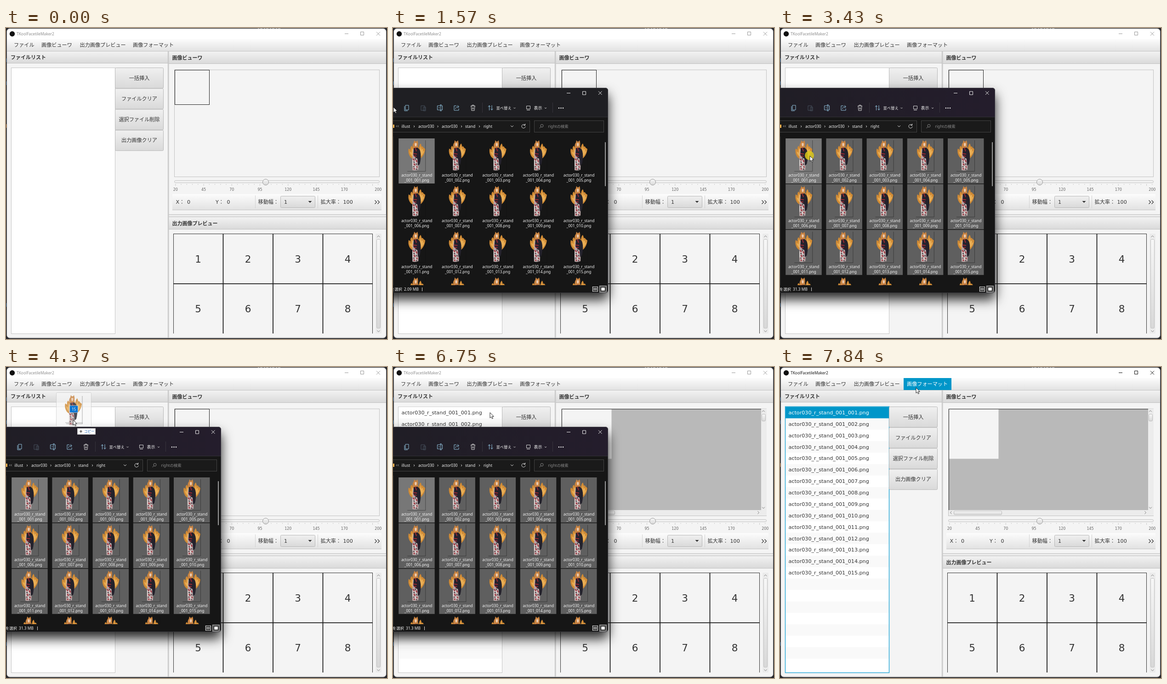
Write an HTML page that moves like this. It is 829 px wide and 676 px high and loops after 8000 ms.

```html
<!DOCTYPE html>
<html lang="ja">
<head>
<meta charset="utf-8">
<title>TKoolFacetileMaker2</title>
<style>
html, body { margin: 0; width: 100%; height: 100%; overflow: hidden; background: #24252a; }
svg { display: block; width: 829px; height: 676px; }
text { white-space: pre; font: 11.15px "DejaVu Sans", "Noto Sans CJK JP", "Noto Sans CJK", sans-serif; fill: #333; }
text.b { font-weight: 700; font-size: 11px; }
text.s { font: 8.4px "Noto Sans", "Noto Sans CJK JP", "Noto Sans CJK", sans-serif; fill: #f4f4f4; }
</style>
</head>
<body>
<svg id="stage" viewBox="0 0 829 676" xmlns="http://www.w3.org/2000/svg"></svg>
<script>
const LOOP = 8000, BLUE = '#0096c9';

// Markup helpers
const rect = (x, y, w, h, fill, more = '') =>
  `<rect x="${x}" y="${y}" width="${w}" height="${h}" fill="${fill}" ${more}/>`;
const box = (x, y, w, h, fill, stroke, more = '') =>
  rect(x, y, w, h, fill, `stroke="${stroke}" ${more}`);
const line = (d, stroke, width = 1, more = '') =>
  `<path d="${d}" fill="none" stroke="${stroke}" stroke-width="${width}" ${more}/>`;
const shape = (d, fill, more = '') => `<path d="${d}" fill="${fill}" ${more}/>`;
const text = (x, y, s, more = '') => `<text x="${x}" y="${y}" ${more}>${s}</text>`;
const mid = 'text-anchor="middle"';
const group = (id, body, more = '') => `<g id="${id}" ${more}>${body}</g>`;
const times = (n, f) => Array.from({ length: n }, (_, i) => f(i)).join('');
const grad = (id, a, b) => `<linearGradient id="${id}" x2="0" y2="1"><stop stop-color="${a}"/><stop offset="1" stop-color="${b}"/></linearGradient>`;
const chevron = (x, y, dir, color = '#777', r = 3) => {
  const turn = { down: 0, left: 90, up: 180, right: 270 }[dir];
  return line(`M${-r} ${-r / 2}L0 ${r / 2} ${r} ${-r / 2}`, color, 1, `transform="translate(${x} ${y}) rotate(${turn})"`);
};
const fileName = i => `actor030_r_stand_001_${String(i + 1).padStart(3, '0')}.png`;

const figure = `<g id="figure">
  ${shape('M36 46Q26 44 23 36Q20 29 22 22L26 25Q25 19 28 16L33 22 44 20Q45 13 48 11Q50 15 50 18Q53 16 54 20L58 23Q57 31 54 36Q51 42 44 46Z', '#cf8a35')}
  ${shape('M31 40Q25 36 24 28L28 31 29 21 34 28ZM45 39Q46 26 48 16L50 25 53 22 53 29 56 26Q54 36 45 42Z', '#e9ae55')}
  ${shape('M31 21Q29 13 33 9L34 4 36.500 7 39 6.500 41 4Q43 10 42 15L43 23 39 26 33 26Z', '#c98442')}
  ${shape('M35 11Q37 9 39.500 11L39 16Q37 18 35.500 16Z', '#eccbb0')}
  ${shape('M31 24L42 22 44 40 43 68Q37 71 30 69L30 46Z', '#b9a5a5')}
  ${shape('M33 21L41 20Q47 23 48 33Q49 44 46 56L42 59 41 44 37 42 32 36Z', '#24222c')}
  ${line('M36 20L39 28M32 33L40 34M33 38L39 39', '#9c2a33', 2)}
  ${line('M32 44L34 48M38 47L40 51M33 55L36 58M39 61L41 63M33 65L35 67', '#a0303a', 2.4)}
  ${line('M36 43L37 46M32 51L35 52M38 55L40 57M32 61L34 62M38 66L40 68', '#3a3039', 1.8)}
  ${line('M36 48L37 54M36.500 60L37 66M31 47L31 60', '#ece6e3', 1.4)}</g>`;

const defs = `<defs>${grad('bar', '#fcfcfc', '#e2e2e2')}${grad('head', '#f2f2f2', '#dadada')}
  ${grad('btn', '#f0f0f0', '#d9d9d9')}${grad('thumb', '#f7f7f7', '#d8d8d8')}
  <linearGradient id="mica"><stop stop-color="#201e25"/><stop offset="1" stop-color="#241d2c"/></linearGradient>
  <filter id="shadow" x="-20%" y="-20%" width="140%" height="150%"><feDropShadow dx="0" dy="14" stdDeviation="13" flood-opacity=".85"/></filter>
  <clipPath id="winClip"><rect x="1.500" y="1" width="826" height="673" rx="7"/></clipPath>
  <clipPath id="gridClip"><rect x="360" y="446" width="440" height="218"/></clipPath>
  <clipPath id="panelClip"><rect x="-30" y="130" width="498" height="446" rx="6"/></clipPath>
  <clipPath id="filesClip"><rect x="0" y="236" width="468" height="323"/></clipPath>${figure}</defs>`;

function captionButtons() {
  return group('caption', `<path d="M737 12.500H745M771.500 8.500H778.500V15.500H771.500ZM806 8.500L814 16.500M814 8.500L806 16.500" fill="none"/>`);
}

function header(x, y, w, h, label, tx, ty) {
  return rect(x, y, w, h, 'url(#head)') + line(`M${x} ${y + h}.5h${w}`, '#c2c2c2') + text(tx, ty, label, 'class="b"');
}

function menus() {
  const items = [[17, 'ファイル'], [77, '画像ビューワ'], [160.5, '出力画像プレビュー']];
  return rect(1, 24, 827, 26, 'url(#bar)') + line('M1 50.500H828', '#c4c4c4') +
    items.map(([x, s]) => text(x, 41, s)).join('') +
    rect(269, 24, 104, 26, BLUE, 'id="menuHot"') + text(276, 41, '画像フォーマット', 'id="menuText"');
}

function fileList() {
  const pitch = 24.87, top = 86.8;
  const rows = times(23, i => rect(12, top + i * pitch, 225, i < 22 ? pitch : 664 - top - i * pitch, i % 2 ? '#f9f9f9' : '#fff'));
  const names = times(15, i => text(18.5, 103 + i * pitch, fileName(i), i ? '' : 'id="firstName"'));
  return box(11.5, 86.5, 226, 578, '#fff', '#c6c6c6') +
    group('rows', rows + rect(12, 87, 225, 24.5, BLUE, 'id="rowHot"') + names) +
    box(11.5, 86, 226, 578.5, 'none', '#22a7d8', 'stroke-width="1.400" id="listFocus"');
}

function buttons() {
  return ['一括挿入', 'ファイルクリア', '選択ファイル削除', '出力画像クリア'].map((s, i) => {
    const y = 86.5 + i * 45.2;
    return box(237.5, y, 105, 44.5, 'url(#btn)', '#b8b8b8', 'rx="2"') + text(290, y + 26, s, mid);
  }).join('');
}

function viewer() {
  const empty = box(367.5, 91.5, 75, 75, 'none', '#222');
  const full = rect(367, 91, 434, 220, '#b9b9b9') + rect(368, 92, 107.5, 107.5, '#f4f4f4') +
    line('M367.500 311V91.500H801', '#333') +
    rect(801, 91, 12, 220, '#ececec') + rect(367, 311, 446, 12, '#ececec') +
    box(802.5, 102.5, 8, 15, 'url(#thumb)', '#bbb', 'rx="2"') + box(378.5, 313, 104, 8, 'url(#thumb)', '#bbb', 'rx="2"') +
    chevron(806, 96, 'up') + chevron(806, 306, 'down') + chevron(372, 316.5, 'left') + chevron(795, 316.5, 'right');
  return box(366.5, 91, 446, 232.5, '#f4f4f4', '#c2c2c2') + group('empty', empty) + group('full', full);
}

function slider() {
  const at = v => 368.8 + (v - 20) * 2.45;
  return box(366.5, 331.5, 446, 5, '#f1f1f1', '#c4c4c4', 'rx="2.500"') +
    times(37, i => line(`M${at(20 + i * 5)} 339v${i % 5 ? 2 : 4}`, '#bbb', .8)) +
    [20, 45, 70, 95, 120, 145, 170, 200].map(v => text(at(v), 354, v, mid + ' style="font-size:8px;fill:#666"')).join('') +
    '<circle cx="565" cy="335" r="6.500" fill="url(#thumb)" stroke="#999"/>';
}

function toolbar() {
  return rect(362, 361, 455, 34, 'url(#bar)') + line('M362 395.500H817', '#c4c4c4') +
    line('M542.500 364V392M678.500 364V392', '#d2d2d2') +
    text(369.5, 382, 'X：') + text(394, 382, '0') + text(456, 382, 'Y：') + text(480.5, 382, '0') +
    text(548.5, 382, '移動幅：') + box(597.5, 365.5, 75, 25, 'url(#btn)', '#b8b8b8', 'rx="2"') + text(605, 382, '1') +
    shape('M657.500 376H665.500L661.500 380Z', '#333') + text(684.5, 382, '拡大率：') + text(733.5, 382, '100') +
    line('M802.500 374.500L806.500 378.500 802.500 382.500M808.500 374.500L812.500 378.500 808.500 382.500', '#333', 1.2);
}

function preview() {
  const size = 108.5;
  const nums = times(8, i => text(418 + i % 4 * size, 509.5 + (i >> 2) * size, i + 1, mid + ' style="font-size:21.500px"'));
  return `<g clip-path="url(#gridClip)">${box(364.5, 447.5, 433, 230, 'none', '#333')}
    ${line('M472.500 447V665M581 447V665M689.500 447V665M364 555.800H798', '#1c1c1c', 1.8)}${nums}</g>` +
    rect(804, 447, 13, 217, '#ebebeb') + box(806.5, 459.5, 8, 193, 'url(#thumb)', '#c0c0c0', 'rx="2"') +
    chevron(810.5, 453, 'up') + chevron(810.5, 659, 'down');
}

function mainWindow() {
  return rect(0, 0, 829, 676, '#24252a') + line('M548 .5H598', '#c8c8c8', 1, 'stroke-dasharray="3 2 5 3"') +
    line('M.5 66V74M.5 116V124M.5 598V606', '#3c6c9a') + line('M.5 209V217', '#d08a45') +
    `<g clip-path="url(#winClip)">${rect(0, 0, 829, 676, '#f4f4f4')}${rect(0, 0, 829, 24, '#fff')}
    <circle cx="13.500" cy="12.700" r="5.700" fill="#111"/>
    ${text(23, 16, 'TKoolFacetileMaker2', 'id="title" class="s"')}${captionButtons()}${menus()}
    ${header(2, 51, 350, 25, 'ファイルリスト', 10, 67.5)}${header(354, 51, 474, 26, '画像ビューワ', 361.5, 68.5)}
    ${fileList()}${buttons()}${viewer()}${slider()}${toolbar()}
    ${rect(354, 405, 474, 6, '#ececec')}${line('M354 405.500H828M354 410.500H828', '#bdbdbd')}
    ${header(354, 411, 474, 26, '出力画像プレビュー', 361.5, 428.5)}${preview()}
    ${line('M352.500 51V674M354 51V674', '#bcbcbc')}${line('M2 673H828', '#c4c4c4')}</g>` +
    box(1.5, 1, 826, 673.5, 'none', '#4a4a4a', 'rx="7" stroke-width=".8"');
}

// Explorer panel
const cell = i => ({ x: 12.2 + i % 5 * 88.2, y: 240 + Math.floor(i / 5) * 99.4 });

function files() {
  return times(20, i => {
    const { x, y } = cell(i), name = fileName(i);
    return `<g transform="translate(${x} ${y})">${rect(0, 0, 78.5, 98, '#777', `id="cell${i}"`)}
      ${line('M19 71.500H58.500V4', '#111', 1, 'opacity=".450"')}<use href="#figure"/>
      ${text(39.5, 83, name.slice(0, 16), mid + ' class="s"')}${text(39.5, 94, name.slice(16), mid + ' class="s"')}</g>`;
  });
}

function commandBar() {
  const ink = '#d5d5d5', tint = '#8fbfda', round = 'stroke-linejoin="round"';
  return line('M378 141.500H386M412.500 138H419.500V145H412.500ZM447 137.500L454.500 145M454.500 137.500L447 145', '#eee') +
    line('M27 168H34V178H27ZM25 170V180H32', tint, 1, round) +
    line('M61 169H69V179H61ZM66 172H71V180H66Z', '#47505d', 1, round) +
    line('M104 169H96.500V178H104M105 169H107.500V178H105M102 167H106M104 167V180M102 180H106M99 173.500H102', tint, 1, round) +
    line('M138 169H133V179H143V175M136 176Q136 171 143 171M140 168L143.500 171 140 174', tint, 1, round) +
    line('M169 169.500H179M172 169V167.500H176V169M170 170L171 179.500H177L178 170M173 172.500V177M175 172.500V177', ink) +
    line('M194.500 162V184M347.500 162V184', '#37343c') +
    line('M209.500 179V169M207 171.500L209.500 168.500 212 171.500M215 168V178M212.500 175.500L215 178.500 217.500 175.500', tint) +
    text(224.5, 176.5, '並べ替え', 'class="s"') + chevron(264.5, 174, 'down', ink, 2) +
    line('M290.500 169.500H298.500V176H290.500ZM291 178.500H298', ink) +
    text(306.5, 176.5, '表示', 'class="s" style="font-size:9px"') + chevron(332, 174, 'down', ink, 2) +
    times(3, i => `<circle cx="${361 + i * 4.5}" cy="174" r="1.300" fill="#eee"/>`);
}

function addressBar() {
  const crumbs = [[18.5, 'illust'], [55, 'actor030'], [106, 'actor030'], [157, 'stand'], [197, 'right']];
  return box(-10, 201.5, 307.5, 25, '#1a1a1a', '#434343') + box(307.5, 201.5, 151, 25, '#1a1a1a', '#434343') +
    rect(0, 210, 3, 7, '#f0ad4a') + chevron(8, 213.5, 'left', '#bbb', 1.8) + chevron(11.5, 213.5, 'left', '#bbb', 1.8) +
    crumbs.map(([x, s]) => text(x, 217, s, 'class="s"')).join('') +
    [46, 97.5, 149, 188].map(x => chevron(x, 214, 'right', '#ddd', 2)).join('') + chevron(259, 213.5, 'down', '#ddd') +
    line('M287 211A4 4 0 1 0 288 214M287.500 208V211.500H284', '#ddd') +
    '<circle cx="324" cy="212.500" r="3" fill="none" stroke="#888"/>' + line('M322 214.500L318.500 218', '#888') +
    text(337.5, 217, 'rightの検索', 'class="s" style="fill:#8b8b8b"');
}

function explorer() {
  return rect(-80, 130, 548, 446, '#191919', 'rx="6" filter="url(#shadow)"') +
    `<g clip-path="url(#panelClip)">${rect(-30, 130, 498, 63, '#1f1f23', 'id="panelBar"')}
    ${line('M0 193.500H468', '#343238')}${commandBar()}${addressBar()}
    <g clip-path="url(#filesClip)">${files()}</g>${rect(0, 236, 1, 323, '#2b2b2b')}
    ${rect(461, 248, 2, 96, '#9c9c9c', 'rx="1"')}
    ${text(20, 571, 'を選択', 'id="picked" class="s" text-anchor="end"')}${text(24, 571, '', 'id="bytes" class="s"')}
    ${line('M0 564V572', '#ddd', 1, 'id="tick"')}
    ${line('M434.500 562.500H445.500V572.500H434.500ZM436 565.500H444M436 567.500H444M436 569.500H444', '#e4e4e4', 1.2)}
    ${box(449.5, 560.5, 15, 14, '#666', '#aaa')}${box(452.5, 563.5, 9, 8, '#fff', '#111', 'stroke-width="1.300"')}</g>` +
    box(-30, 130.5, 497.5, 445, 'none', '#4a4a4f', 'rx="6" stroke-width=".7"');
}

const ghost = box(.5, .5, 76, 74, '#f7f7f7', '#c9c9c9', 'rx="2" opacity=".700"') +
  line('M20 66H58M22 68.500H58M57 8V68', '#aaa', 1) +
  '<use href="#figure" x="-2" y="2" opacity=".8"/>' + rect(29.5, 29, 18, 15, '#0b74d1', 'stroke="#fff" stroke-width=".6"') +
  text(38.5, 39.8, '15', mid + ' class="s"') + box(46.5, 78.5, 39, 13, '#fff', '#ccc', 'stroke-width=".7"') +
  line('M51 85H57M54 82V88', '#222', 1.2) + text(61, 88, 'コピー', 'class="s" style="fill:#1a63b5;font-size:7.500px"');

const arrow = shape('M0 0V11.800L2.700 9.300 4.600 13.400 6.500 12.500 4.700 8.500H8.300Z', '#fff', 'stroke="#111" stroke-width=".9"');
const resize = shape('M-9 0L-5 -4V-1.300H5V-4L9 0 5 4V1.300H-5V4Z', '#fff', 'stroke="#111" stroke-width="1"');

document.getElementById('stage').innerHTML = defs + mainWindow() + group('explorer', explorer()) + group('ghost', ghost) +
  group('pointer', '<circle id="press" cx="-1" cy="-1" r="10" fill="#dcc81c" opacity=".850"/>' + group('arrow', arrow) + group('resize', resize));

// Pointer poses: time, x, y, kind
const pointer = [
  [0, 0, 0, 'none'],
  ...Array.from({ length: 6 }, (_, k) => [130 + k * 160, 698 - k * 139, 592 - k * 86.6, 'arrow']),
  [1090, 0, 0, 'none'],
  [1570, 1, 172, 'arrow'], [1720, 60, 205, 'arrow'], [1870, 165, 275, 'arrow'], [2030, 275, 365, 'arrow'],
  [2180, 360, 435, 'arrow'], [2340, 408, 468, 'arrow'], [2490, 420, 473, 'arrow'], [2640, 420, 473, 'press'],
  [2800, 410, 462, 'arrow'], [2950, 305, 385, 'arrow'], [3110, 160, 310, 'arrow'], [3270, 75, 280, 'arrow'],
  [3430, 65, 278, 'press'], [3580, 146, 169, 'arrow'], [3740, 144, 185, 'arrow'], [3900, 145, 160, 'arrow'],
  [4060, 146, 135, 'arrow'], [4220, 146, 115, 'arrow'], [4380, 150, 106, 'arrow'], [4540, 178, 106, 'arrow'],
  [4690, 199, 107, 'resize'], [4860, 204, 107, 'resize'], [5020, 208, 106, 'resize'], [5180, 210, 105, 'resize'],
  [5630, 210, 102, 'resize'], [5950, 211, 101, 'resize'], [6270, 211.5, 100, 'resize'],
  [6750, 211, 99, 'arrow'], [7230, 211, 99, 'press'], [7380, 213, 96, 'arrow'], [7530, 236, 78, 'arrow'],
  [7680, 275, 56, 'arrow'], [7840, 296, 45, 'arrow']
];
const ghostY = [[3740, 125], [3900, 100], [4060, 75], [4220, 55], [4380, 46]];

const $ = id => document.getElementById(id);
const held = (keys, t) => keys.findLast(k => k[0] <= t) || keys[0];
const show = (id, on) => $(id).setAttribute('visibility', on ? 'inherit' : 'hidden');
const move = (id, x, y) => $(id).setAttribute('transform', `translate(${x} ${y})`);

function cellFill(i, x, y, picked) {
  if (i === 0) return '#777';
  if (picked && i < 15) return '#5f5f5f';
  const c = cell(i);
  const over = x >= c.x && x < c.x + 78.5 && y >= c.y && y < Math.min(c.y + 98, 559);
  return over ? '#4d4d4d' : 'none';
}

function draw(t) {
  const [, x, y, kind] = held(pointer, t);
  const open = t >= 1570 && t < 7230, picked = t >= 2640, loaded = t >= 6750, active = t >= 7230, menu = t >= 7840;

  move('pointer', x, y);
  show('pointer', kind !== 'none');
  show('press', kind === 'press');
  show('arrow', kind !== 'resize');
  show('resize', kind === 'resize');
  if (kind === 'none') ['press', 'arrow', 'resize'].forEach(id => show(id, false));

  show('ghost', t >= 3740 && t < 6580);
  move('ghost', t < 4220 ? 107.5 : 109, held(ghostY, t)[1]);

  show('explorer', open);
  if (open) {
    for (let i = 0; i < 20; i++) $('cell' + i).setAttribute('fill', cellFill(i, x, y, picked));
    $('panelBar').setAttribute('fill', t < 1720 ? '#1f1f23' : 'url(#mica)');
    $('picked').setAttribute('x', picked ? 24 : 20);
    $('bytes').setAttribute('x', picked ? 28 : 24);
    $('bytes').textContent = picked ? '31.3 MB' : '2.09 MB';
    move('tick', picked ? 68.5 : 63.5, 0);
  }

  show('rows', loaded);
  show('full', loaded);
  show('empty', !loaded);
  show('rowHot', active);
  show('listFocus', active);
  show('menuHot', menu);
  $('firstName').style.fill = active ? '#fff' : '#333';
  $('menuText').style.fill = menu ? '#fff' : '#333';
  $('title').style.fill = active ? '#111' : '#8c8c8c';
  $('caption').setAttribute('stroke', active ? '#111' : '#999');
}

const start = performance.now();
function tick() {
  draw((performance.now() - start) % LOOP);
  requestAnimationFrame(tick);
}
tick();
</script>
</body>
</html>
```
